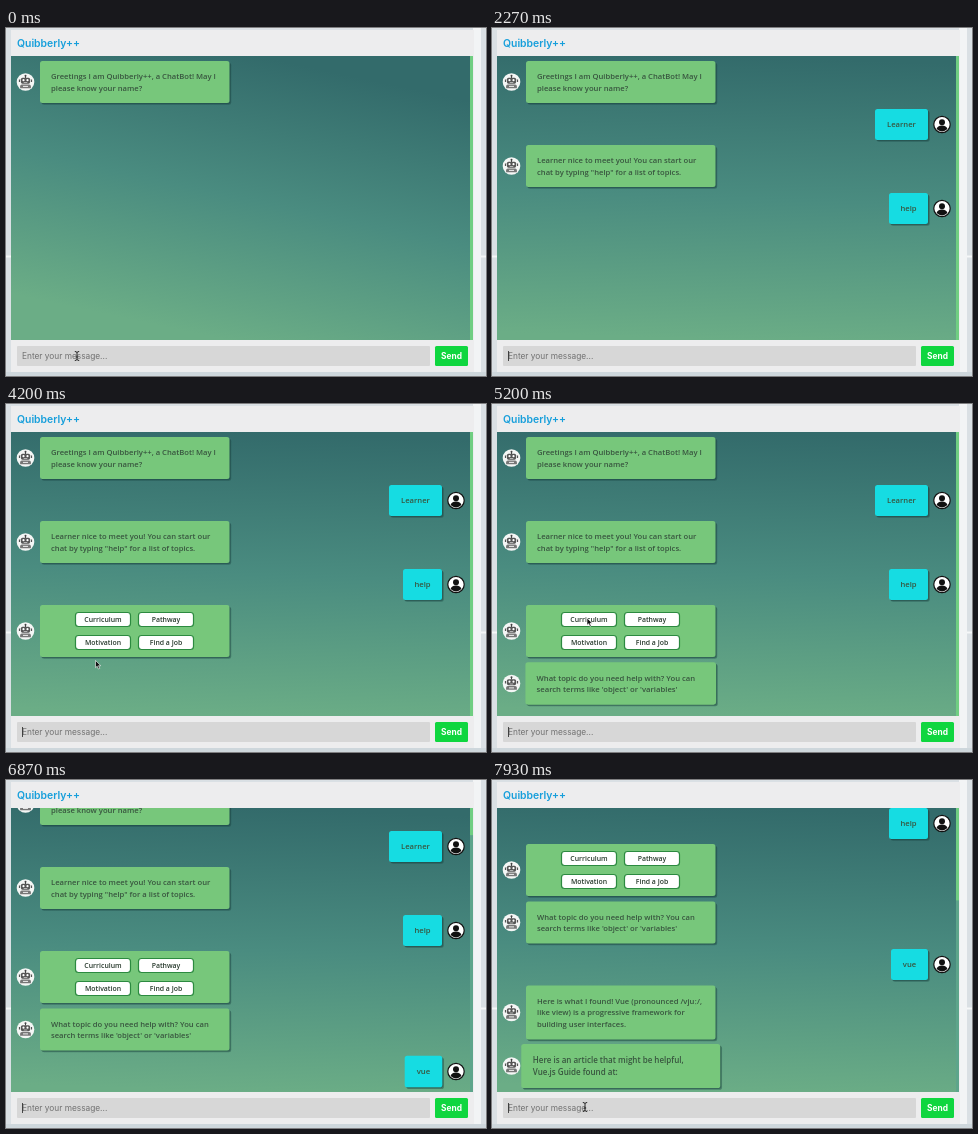
Animation, 480 px wide and 348 px high, one loop 8 s. Source, as an HTML page:

```html
<!DOCTYPE html>
<html lang="en">
<head>
<meta charset="utf-8">
<title>Chat</title>
<style>
  html, body { margin: 0; width: 100%; height: 100%; overflow: hidden; }
  svg { display: block; width: 100vw; height: 100vh; }
  .ui { font-family: Inter, sans-serif; }
  .say { font: 600 7.65px "Open Sans", sans-serif; fill: #38553f; }
  .option { font: 600 6.9px "Open Sans", sans-serif; fill: #26382b; text-anchor: middle; }
</style>
</head>
<body>
<svg viewBox="0 0 480 348">
  <defs>
    <linearGradient id="sky" gradientUnits="userSpaceOnUse" x1="236" y1="28" x2="236" y2="312">
      <stop offset="0" stop-color="#336b6b"/>
      <stop offset=".5" stop-color="#4a8c80"/>
      <stop offset="1" stop-color="#6bad86"/>
    </linearGradient>
    <clipPath id="view"><rect x="5" y="28" width="459" height="284"/></clipPath>
    <g id="bot">
      <circle r="8.8" fill="#f4f6f5"/>
      <path d="M0-6.5V-4" stroke="#444" stroke-width="1"/>
      <circle cy="-6.3" r="1" fill="#444"/>
      <rect x="-4.6" y="-4.3" width="9.2" height="6" rx="1.6" fill="#555"/>
      <path d="M-6-2.5v2.5M6-2.5v2.5" stroke="#555" stroke-width="1.2"/>
      <circle cx="-2" cy="-1.8" r="1.1" fill="#fff"/>
      <circle cx="2" cy="-1.8" r="1.1" fill="#fff"/>
      <path d="M-1.8.5h3.6" stroke="#ddd" stroke-width=".7"/>
      <path d="M-5.4 6.2V4.3q0-1.8 1.8-1.8h7.2q1.8 0 1.8 1.8v1.9z" fill="#777"/>
      <path d="M-2.5 4.4h5" stroke="#eee" stroke-width="1"/>
    </g>
    <g id="person">
      <circle r="8.2" fill="#fff" stroke="#111" stroke-width="1.2"/>
      <circle cy="-2.2" r="3" fill="#111"/>
      <path d="M-5.4 4.6Q-4.6 1 0 1t5.4 3.6Q3 7 0 7t-5.4-2.4z" fill="#111"/>
    </g>
  </defs>

  <rect width="480" height="348" fill="#dae0e4"/>
  <path d="M0 228.500H480" stroke="#f5f7f8" stroke-width="2"/>
  <rect y="344" width="480" height="4" fill="#ced7dc"/>
  <rect x="467" width="8" height="344" fill="#f2f4f5"/>
  <rect x="5" y="2" width="463" height="342" fill="#ededee"/>
  <text class="ui" x="11" y="18.700" font-size="10.400" font-weight="600" fill="#179fdb">Quibberly++</text>

  <rect x="5" y="28" width="459" height="284" fill="url(#sky)"/>
  <rect x="464" y="28" width="3" height="284" fill="#70ce82"/>
  <rect id="thumb" x="464" width="3" fill="#5da58b"/>
  <g clip-path="url(#view)"><g id="chat"></g></g>

  <rect x="11" y="318" width="413" height="20" rx="1" fill="#d7d7d7"/>
  <text class="ui" id="entry" x="16" y="331" font-size="8.300"></text>
  <rect id="caret" y="323" width=".8" height="10" fill="#222"/>
  <rect x="429" y="318" width="33" height="20" rx="1.500" fill="#0fd63f"/>
  <text class="ui" x="445.500" y="331" font-size="8.400" font-weight="700" fill="#fff" text-anchor="middle">Send</text>

  <path id="ibeam" d="M-2.200-4.500Q0-4.500 0-3.200Q0-4.500 2.200-4.500M0-3.200V3.200M-2.200 4.500Q0 4.500 0 3.200Q0 4.500 2.200 4.500M-1.200 1h2.400" fill="none" stroke="#222" stroke-width="1"/>
  <path id="arrow" d="M0 0V7.200L1.700 5.700 2.900 8.500 4.200 7.900 3 5.200H5.300z" fill="#111" stroke="#fff" stroke-width=".6"/>
</svg>
<script>
const LOOP = 8000, PULSE = 900, TOP = 28, VIEW = 284;
const $ = id => document.getElementById(id);

// at: time the message arrives; y, h: place in the unscrolled chat
const messages = [
  { at: -PULSE, y: 33, h: 42, lines: ["Greetings I am Quibberly++, a ChatBot! May I", "please know your name?"] },
  { at: 800, y: 81, h: 31, user: "Learner", w: 53 },
  { at: 1080, y: 117, h: 42, lines: ["Learner nice to meet you! You can start our", "chat by typing \"help\" for a list of topics."] },
  { at: 2250, y: 165, h: 31, user: "help", w: 39 },
  { at: 3070, y: 201, h: 52, options: ["Curriculum", "Pathway", "Motivation", "Find a Job"] },
  { at: 5100, y: 258.5, h: 42, lines: ["What topic do you need help with? You can", "search terms like 'object' or 'variables'"] },
  { at: 6700, y: 306, h: 31, user: "vue", w: 37 },
  { at: 6940, y: 342.5, h: 54, lines: ["Here is what I found! Vue (pronounced /vjuː/,", "like view) is a progressive framework for", "building user interfaces."] },
  { at: 7480, y: 402, h: 42, lines: ["Here is an article that might be helpful,", "Vue.js Guide found at:"] }
];

const typing = [
  { word: "Learner", keys: [70, 140, 200, 470, 540, 600, 670], send: 800 },
  { word: "help", keys: [1330, 1460, 1660, 1800], send: 2250 },
  { word: "vue", keys: [6270, 6400, 6530], send: 6700 }
];

// time, x, y; the pointer is hidden between the tracks
const tracks = [
  [[0, 71, 328], [70, 71, 328]],
  [[3600, 71, 328], [3900, 75, 320], [4200, 89.5, 256.5], [4600, 95, 214], [5650, 95, 214], [5950, 88.5, 328], [6270, 88.5, 328]],
  [[7500, 88.5, 328], [7900, 93, 327], [LOOP, 93, 327]]
];

function box(x, y, w, h, fill) {
  const rect = (d, paint) => `<rect x="${x + d}" y="${y + d}" width="${w}" height="${h}" rx="2.5" ${paint}/>`;
  return rect(1.7, 'fill="#173f3c" opacity=".4"') + rect(.9, 'fill="#173f3c" opacity=".35"') + rect(0, `fill="${fill}"`);
}

function optionButton(label, i) {
  const x = 69 + i % 2 * 63, y = 208 + (i >> 1) * 23;
  return `<rect x="${x + .5}" y="${y + .5}" width="55" height="14" rx="3" fill="#fff" stroke="#2c8a40" stroke-width="1.2"/>
    <text class="option" x="${x + 28}" y="${y + 10.2}">${label}</text>`;
}

function bubble(m) {
  const x = m.user ? 436 - m.w : 34, w = m.w || 189.5, mid = m.y + m.h / 2;
  let body = box(x, m.y, w, m.h, m.user ? "#16dce2" : "#77c77b");
  if (m.user) body += `<text class="say" x="${x + w / 2}" y="${mid + 2.8}" text-anchor="middle">${m.user}</text>`;
  if (m.lines) body += m.lines.map((s, i) => `<text class="say" x="45" y="${m.y + 18.2 + i * 11.5}">${s}</text>`).join("");
  if (m.options) body += `<g id="options">${m.options.map(optionButton).join("")}</g>`;
  m.cx = x + w / 2;
  m.cy = mid;
  return `<g><g>${body}</g><use href="#${m.user ? "person" : "bot"}" x="${m.user ? 450 : 19.5}" y="${mid}"/></g>`;
}

$("chat").innerHTML = messages.map(bubble).join("");
messages.forEach((m, i) => m.node = $("chat").children[i]);

const clamp = v => Math.max(0, Math.min(1, v));
const ease = v => v * v * (3 - 2 * v);
const show = (node, on) => node.setAttribute("visibility", on ? "visible" : "hidden");

function drawChat(t) {
  let bottom = TOP + VIEW;
  for (const m of messages) {
    const visible = t >= m.at;
    m.node.setAttribute("display", visible ? "inline" : "none");
    if (!visible) continue;
    const s = 1 + .05 * Math.sin(Math.PI * clamp((t - m.at) / PULSE)) ** 2;
    m.node.firstChild.setAttribute("transform",
      `translate(${m.cx} ${m.cy}) scale(${s}) translate(${-m.cx} ${-m.cy})`);
    bottom = Math.max(bottom, m.y + m.h + 5);
  }
  $("options").setAttribute("opacity", clamp((t - 3200) / 400));

  const scroll = bottom - TOP - VIEW, ratio = VIEW / (VIEW + scroll);
  $("chat").setAttribute("transform", `translate(0 ${-scroll})`);
  $("thumb").setAttribute("y", TOP + scroll * ratio);
  $("thumb").setAttribute("height", scroll ? VIEW * ratio : 0);
  $("sky").setAttribute("gradientTransform", `rotate(${2 + 10 * (1 - ease(clamp(t / 1500)))} 236 170)`);
}

function drawEntry(t) {
  const now = typing.find(e => t >= e.keys[0] && t < e.send);
  const text = now ? now.word.slice(0, now.keys.filter(k => t >= k).length) : "";
  const entry = $("entry");
  entry.textContent = text || "Enter your message...";
  entry.setAttribute("fill", text ? "#111" : "#707070");
  $("caret").setAttribute("x", 16 + (text ? entry.getComputedTextLength() + .2 : 0));
  show($("caret"), t >= 70);
}

function drawPointer(t) {
  const track = tracks.find(p => t >= p[0][0] && t < p[p.length - 1][0]);
  show($("ibeam"), false);
  show($("arrow"), false);
  if (!track) return;
  const i = track.findIndex(p => t < p[0]);
  const [t0, x0, y0] = track[i - 1], [t1, x1, y1] = track[i];
  const k = ease((t - t0) / (t1 - t0)), x = x0 + (x1 - x0) * k, y = y0 + (y1 - y0) * k;
  const pointer = $(y > 318 ? "ibeam" : "arrow");
  pointer.setAttribute("transform", `translate(${x} ${y})`);
  show(pointer, true);
}

const start = performance.now();
function frame() {
  const t = (performance.now() - start) % LOOP;
  drawChat(t);
  drawEntry(t);
  drawPointer(t);
  requestAnimationFrame(frame);
}
frame();
</script>
</body>
</html>
```
